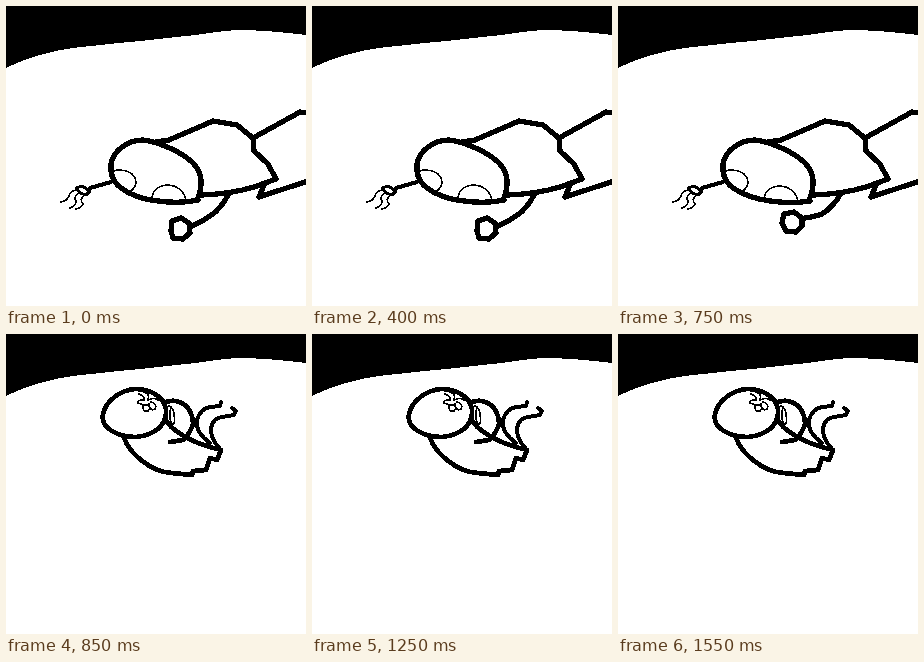
Animation, 300 px wide and 300 px high, one loop 1.6 s. Source, as an HTML page without scripts:

```html
<!DOCTYPE html>
<html lang="en">
<head>
<meta charset="utf-8">
<title>Crawl and curl</title>
<style>
  html, body { margin: 0; width: 100%; height: 100%; overflow: hidden; background: #fff; }
  svg { display: block; width: 100vw; height: 100vh; }
  .ink { fill: none; stroke: #000; stroke-width: 5.3; stroke-linecap: round; stroke-linejoin: round; }
  .curled { stroke-width: 4.7; }
  .mid { stroke-width: 4; }
  .thin { stroke-width: 1.6; }

  /* Two scenes of 800 ms, each alternating two poses every 50 ms */
  .first { animation: first 1600ms step-end infinite; }
  .second { animation: second 1600ms step-end infinite; }
  .even { animation: first 100ms step-end infinite; }
  .odd { animation: second 100ms step-end infinite; }
  .shake { animation: shake 100ms step-end infinite; }
  @keyframes first { 0% { opacity: 1; } 50%, 100% { opacity: 0; } }
  @keyframes second { 0% { opacity: 0; } 50%, 100% { opacity: 1; } }
  @keyframes shake { 0% { transform: translate(-1px, 0); } 50%, 100% { transform: none; } }
</style>
</head>
<body>
<svg viewBox="0 0 300 300" shape-rendering="crispEdges">
  <path d="M0 0H300V29Q260 24 232 24Q215 25 190 29Q160 32 135 35Q110 37 85 40Q60 42 42 47Q20 52 0 62Z"/>

  <g class="ink first">
    <!-- body and legs -->
    <path d="M150 136L163 134L207 115L231 119L247 132L248 145L262 158L270 173L248 181Q225 188 196 189"/>
    <path d="M247 132L294 106L302 107M258 179L253 191L302 175"/>
    <!-- head -->
    <path d="M115 182C107 176 104 168 105 158C107 146 120 134 137 134C154 136 177 147 187 157C197 167 197 181 191 194"/>
    <path class="thin" d="M107 165C119 162 130 167 130 177Q129 183 122 187"/>
    <!-- reaching hand -->
    <path class="mid" d="M105 176L84 182"/>
    <path style="stroke-width:3" d="M70 182L76 180L84 185L80 189L74 187Z"/>
    <path class="thin" d="M70 184Q63 186 63 190Q61 195 55 196M73 187Q67 191 70 195Q70 200 64 202M78 189Q73 194 77 198Q75 202 70 203"/>

    <g class="even">
      <path d="M115 182Q130 193 152 195Q175 198 192 194"/>
      <path class="thin" d="M146 192C147 175 176 174 180 194"/>
      <path d="M222 189Q215 203 204 210Q196 216 186 220"/>
      <path d="M166 215L175 212L183 217L184 227L177 233L167 232L165 225Z"/>
    </g>
    <g class="odd">
      <path d="M115 182Q130 192 152 195Q175 198 192 195"/>
      <path class="thin" d="M146 193C147 176 176 175 180 195"/>
      <path d="M222 189Q215 201 204 208Q196 211 187 212"/>
      <path d="M166 208L176 206L184 212L184 220L178 226L168 225L164 217Z"/>
    </g>
  </g>

  <g class="second">
    <g class="ink curled shake">
      <!-- head and arm -->
      <path d="M97 80C100 67 114 56 129 55C146 55 159 64 160 76C161 91 149 101 130 103C113 103 94 95 97 80Z"/>
      <path d="M160 68Q172 64 181 73Q187 80 187 90Q184 100 177 106L164 108"/>
      <!-- body -->
      <path d="M118 103C122 118 144 138 166 139L186 141L187 137L200 136L204 124L211 126L215 116Q187 109 175 100Q163 93 160 86"/>
      <!-- legs -->
      <path class="mid" d="M214 115Q204 104 205 94Q207 84 216 83L228 81L230 77L226 74"/>
      <path class="mid" d="M204 109Q189 98 191 86Q194 75 204 73L214 72L215 68"/>
      <!-- fingers and sleeve -->
      <path class="thin" d="M133 60Q139 62 138 66Q131 66 132 69Q138 72 143 70M138 58Q144 60 142 66Q148 63 152 66H158M137 72Q136 78 142 77Q146 72 141 71M145 68Q152 70 149 75Q146 77 144 74M163 72Q169 76 168 82Q170 88 166 92M165 73Q162 83 166 90"/>
    </g>
  </g>
</svg>
</body>
</html>
```
